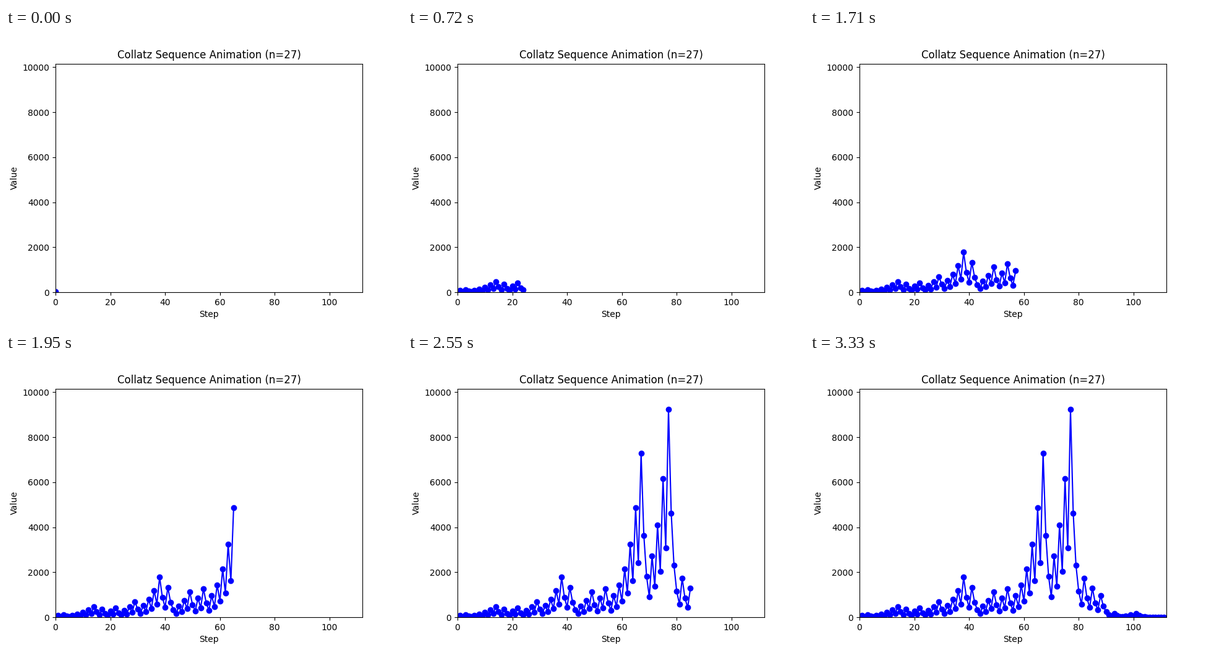
Recreate the animation shown at these times as a matplotlib script. Size 640 by 480 pixels, loop 3360 ms.

```python
import matplotlib.pyplot as plt
from matplotlib.animation import FuncAnimation

START = 27
INTERVAL = 30


def collatz(n):
    """Return the Collatz sequence from n down to 1."""
    terms = [n]
    while n != 1:
        n = 3 * n + 1 if n % 2 else n // 2
        terms.append(n)
    return terms


values = collatz(START)

fig, ax = plt.subplots(figsize=(6.4, 4.8), dpi=100)
ax.set_xlim(0, len(values))
ax.set_ylim(0, max(values) * 1.1)
ax.set_title(f"Collatz Sequence Animation (n={START})")
ax.set_xlabel("Step")
ax.set_ylabel("Value")
line, = ax.plot([], [], "bo-")


def init():
    line.set_data([], [])
    return line,


def update(step):
    line.set_data(range(step + 1), values[:step + 1])
    return line,


anim = FuncAnimation(fig, update, frames=len(values), init_func=init,
                     interval=INTERVAL, repeat=True, repeat_delay=0)
plt.show()
```
